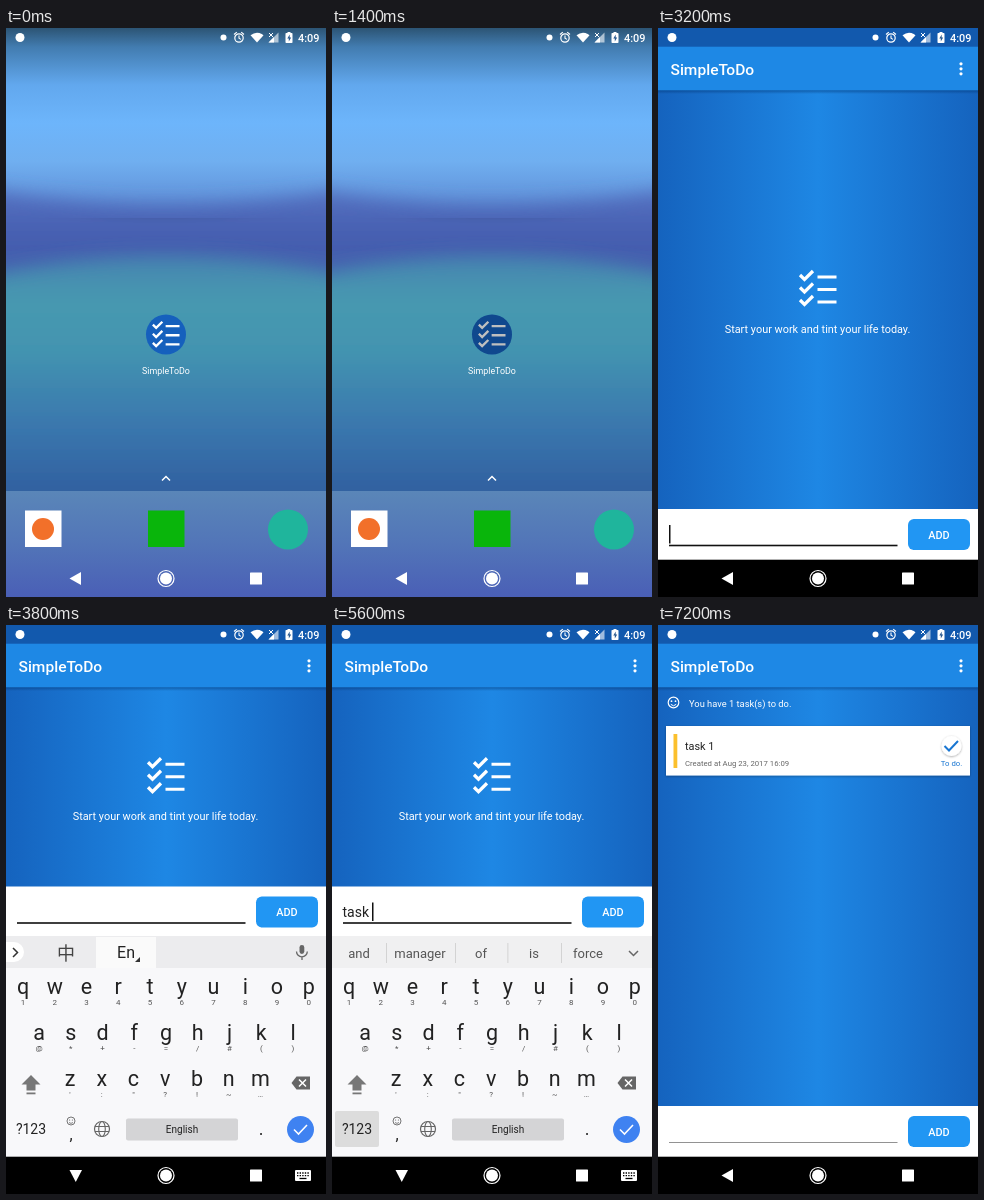
An HTML page for the animation above (8000 ms loop, 320 px wide and 569 px high).

```html
<!DOCTYPE html>
<html lang="en">
<head>
<meta charset="utf-8">
<title>SimpleToDo</title>
<style>
  html, body { margin: 0; width: 100%; height: 100%; overflow: hidden; background: #000; }
  svg { display: block; width: 100vw; height: 100vh; }
  text { font-family: Roboto, "Noto Sans CJK SC", sans-serif; white-space: pre; }
  .mid { text-anchor: middle; }
  .line { fill: none; stroke: #fff; }
</style>
</head>
<body>
<svg id="stage" viewBox="0 0 320 569" preserveAspectRatio="none">
  <defs>
    <linearGradient id="blue">
      <stop offset="0" stop-color="#1563be"/>
      <stop offset=".5" stop-color="#1e87e4"/>
      <stop offset="1" stop-color="#1563be"/>
    </linearGradient>
    <linearGradient id="sky" x2="0" y2="1">
      <stop offset="0" stop-color="#2c5474"/>
      <stop offset=".1" stop-color="#427cb0"/>
      <stop offset=".3" stop-color="#62a8ee"/>
      <stop offset=".5" stop-color="#6db5fb"/>
      <stop offset=".7" stop-color="#70aff0"/>
      <stop offset="1" stop-color="#5a86d0"/>
    </linearGradient>
    <linearGradient id="band" x2="0" y2="1">
      <stop offset="0" stop-color="#5672c2"/>
      <stop offset=".4" stop-color="#445cae"/>
      <stop offset="1" stop-color="#4468b2"/>
    </linearGradient>
    <linearGradient id="sea" gradientUnits="userSpaceOnUse" x1="0" y1="220" x2="0" y2="463">
      <stop offset="0" stop-color="#4580b0"/>
      <stop offset=".22" stop-color="#4699b0"/>
      <stop offset=".42" stop-color="#4394b0"/>
      <stop offset=".72" stop-color="#3a78ae"/>
      <stop offset="1" stop-color="#3160a0"/>
    </linearGradient>
    <linearGradient id="tray" x2="0" y2="1">
      <stop offset="0" stop-color="#5a86b8"/>
      <stop offset=".5" stop-color="#5275b8"/>
      <stop offset="1" stop-color="#4a5fb6"/>
    </linearGradient>
    <linearGradient id="shade" x2="0" y2="1">
      <stop offset="0" stop-color="#00306a" stop-opacity=".5"/>
      <stop offset="1" stop-color="#00306a" stop-opacity="0"/>
    </linearGradient>
    <filter id="soft" x="-20%" y="-30%" width="140%" height="160%"><feGaussianBlur stdDeviation="9"/></filter>
    <filter id="drop" x="-20%" y="-20%" width="140%" height="150%">
      <feDropShadow dx="0" dy=".8" stdDeviation=".8" flood-opacity=".35"/>
    </filter>
    <g id="list" fill="none" stroke="#fff" stroke-width="3.2">
      <path d="M-18-13.500l4.500 4.500 8.500-8.500M-18-1l4.500 4.500 8.500-8.500M-18 11.500l4.500 4.500 8.500-8.500"/>
      <path d="M-.5-11.500h19M-.5 1h19M-.5 13.500h19"/>
    </g>
  </defs>
</svg>
<script>
const stage = document.getElementById('stage');
const STEP = 200, LOOP = 8000;

const rect = (x, y, w, h, fill, more = '') =>
  `<rect x="${x}" y="${y}" width="${w}" height="${h}" fill="${fill}" ${more}/>`;
const disc = (x, y, r, fill, more = '') =>
  `<circle cx="${x}" cy="${y}" r="${r}" fill="${fill}" ${more}/>`;
const line = (d, color, width, more = '') =>
  `<path d="${d}" fill="none" stroke="${color}" stroke-width="${width}" ${more}/>`;
const label = (s, x, y, size, fill = '#fff', more = '') =>
  `<text x="${x}" y="${y}" font-size="${size}" fill="${fill}" ${more}>${s}</text>`;
const mid = (s, x, y, size, fill, more = '') => label(s, x, y, size, fill, 'class="mid" ' + more);
const group = (id, body) => `<g id="${id}">${body}</g>`;
const icon = (x, y, k) => `<use href="#list" transform="translate(${x} ${y}) scale(${k})"/>`;

const wallpaper =
  rect(0, 0, 320, 190, 'url(#sky)') +
  `<path d="M-40 158Q160 196 360 158V300H-40Z" fill="url(#band)" filter="url(#soft)"/>` +
  `<path d="M-40 252Q160 204 360 252V520H-40Z" fill="url(#sea)" filter="url(#soft)"/>`;

const home = wallpaper +
  disc(160, 306.5, 20, '#1560bd') + icon(160, 306.5, .73) +
  disc(160, 306.5, 20, '#000', 'id="press" opacity=".25"') +
  mid('SimpleToDo', 160, 346, 8.9, '#fff') +
  line('M156 452.500l4-4 4 4', '#fff', 1.5);

const tray = rect(0, 463, 320, 106, 'url(#tray)') +
  rect(19, 482.5, 36.5, 36.5, '#fff') + disc(37, 501, 11, '#f2702a') +
  rect(142, 482.5, 36.5, 36.5, '#09b50b') +
  disc(282, 501.5, 20, '#1fb59c');

const empty = icon(160, 260.5, 1) +
  mid('Start your work and tint your life today.', 159.5, 304.5, 10.9, '#fff');

const tasks =
  disc(15.500, 77.500, 5.300, 'none', 'stroke="#fff" stroke-width="1.2"') +
  disc(13.500, 76.200, .9, '#fff') + disc(17.500, 76.200, .9, '#fff') +
  line('M12.800 79.300q2.700 3 5.400 0', '#fff', 1) +
  label('You have 1 task(s) to do.', 31, 81.5, 9.33) +
  rect(8, 101, 304, 49.5, '#fff', 'filter="url(#drop)"') +
  rect(15.500, 109, 3.800, 34, '#fbc02d') +
  label('task 1', 27, 125, 10.9, '#222') +
  label('Created at Aug 23, 2017 16:09', 27, 141, 7.78, '#666') +
  disc(293.500, 121, 10, '#fff', 'filter="url(#drop)"') +
  line('M286.500 121l4.500 4.500 9-9.500', '#1976d2', 2) +
  mid('To do.', 293.500, 141, 7.78, '#1976d2');

const inputBar = rect(0, 481, 320, 51, '#fff') +
  rect(11, 517, 228.5, .8, '#777', 'id="rule"') +
  label('', 10.500, 511.500, 14, '#222', 'id="typed"') +
  rect(11, 497, 1.5, 18.500, '#111', 'id="caret"') +
  rect(250, 491, 62, 31, '#2196f3', 'rx="6" id="add"') +
  mid('ADD', 281, 510.500, 10.9, '#fff', 'font-weight="500"');

const app = rect(0, 0, 320, 532, 'url(#blue)') +
  group('empty', empty) + group('tasks', tasks) +
  rect(0, 62, 320, 4, 'url(#shade)') + rect(0, 18, 320, 44.300, '#1e88e5') +
  label('SimpleToDo', 12.500, 46.500, 15.55, '#fff', 'font-weight="500"') +
  [35.800, 40.800, 45.800].map(y => disc(303, y, 1.600, '#fff')).join('') +
  group('bar', inputBar) +
  rect(0, 0, 320, 18.700, '#1259ad');

/* Keyboard */
const INK = '#222', DIM = '#555';
const spread = (n, x0) => Array.from({ length: n }, (_, i) => x0 + i * 31.75);
const row = (keys, hints, x0, y) => spread(keys.length, x0).map((x, i) =>
  mid(keys[i].replace('&', '&amp;').replace('<', '&lt;'), x, y, 21.5, INK) +
  (hints ? mid(hints[i], x, y + 11, 8, DIM) : '')).join('');

const tools = rect(0, 311, 320, 32, '#ececee') + rect(90, 312, 60, 31, '#fafafa') +
  rect(-10, 317, 28, 20, '#fff', 'rx="10"') + line('M7 323l4.500 4.500-4.500 4.500', '#333', 1.500) +
  mid('中', 60, 334.500, 18, '#444') + mid('En', 120, 333, 16, INK) +
  `<path d="M134 332v5h-5z" fill="#333"/>` +
  rect(293.500, 320, 4.800, 9, '#666', 'rx="2.400"') +
  line('M290.500 326.500a5.400 5.400 0 0 0 10.800 0M296 332v3', '#666', 1.300);

const words = rect(0, 311, 320, 32, '#f0f0f1') +
  [54, 123, 175.500, 229].map(x => rect(x, 318, .8, 20, '#ccc')).join('') +
  [27, 88, 149, 202, 256].map(x => mid('', x, 332.500, 13, DIM, 'data-word')).join('') +
  line('M297 326l4.500 4.500 4.500-4.500', '#666', 1.500);

const letters = row([...'qwertyuiop'], [...'1234567890'], 17, 369) +
  row([...'asdfghjkl'], [...'@*+-=/#()'], 33, 415) +
  row([...'zxcvbnm'], [...'\':"?!~…'], 64, 461) +
  `<path d="M25 450l-9.500 9.500h5v6h9v-6h5z" fill="#777"/>` + rect(20.500, 467.500, 9, 1.800, '#777') +
  mid('?123', 25, 509, 14, INK) +
  disc(65, 496, 4, 'none', 'stroke="#666" stroke-width=".9"') +
  disc(63.600, 495, .6, '#666') + disc(66.400, 495, .6, '#666') + line('M63 497.500q2 1.800 4 0', '#666', .8) +
  mid(',', 65, 515, 16, INK) +
  disc(96, 504, 7.500, 'none', 'stroke="#666" stroke-width="1.200"') +
  `<ellipse cx="96" cy="504" rx="3.300" ry="7.500" fill="none" stroke="#666" stroke-width="1.100"/>` +
  line('M89 501.500h14M89 506.500h14', '#666', 1.100);

const symbols = row([...'1234567890'], null, 17, 373) +
  row([...'@#$%&-+()'], null, 33, 419) + row([...'*"\':;!?'], null, 64, 465) +
  mid('=\\&lt;', 25, 463, 14, INK) + mid('ABC', 25, 509, 13, INK) +
  mid(',', 65, 509, 18, INK) + mid('_', 96, 507, 18, INK);

const board = rect(0, 311, 320, 221, '#f8f8fa') +
  group('tools', tools) + group('words', words) +
  rect(0, 0, 0, 0, '#dcdcdc', 'rx="2" id="hit"') +
  group('letters', letters) + group('symbols', symbols) +
  `<path d="M285.500 458l5-6.500h13.500v13h-13.500z" fill="#666"/>` +
  line('M293 454.500l7 7M300 454.500l-7 7', '#fff', 1.500) +
  rect(120, 493.500, 112, 22, '#d4d4d6', 'rx="2" id="space"') +
  mid('English', 176, 508, 10, INK) + mid('.', 255, 510, 18, INK) +
  disc(294.500, 504.500, 13.500, '#3f82f1') + line('M288 504.500l4.500 4.500 8.500-9', '#fff', 1.600);

const status = disc(14, 9.500, 4.500, '#fff') + disc(217.500, 9.500, 3, '#fff') +
  disc(233, 10, 4.200, 'none', 'stroke="#fff" stroke-width="1.200"') +
  line('M233 7.500v2.700l2 1.200M228 6.500l2.800-2.400M238 6.500l-2.800-2.400', '#fff', 1.100) +
  `<path d="M244.500 7.200q6.500-5 13 0L251 14.500z" fill="#fff"/>` +
  `<path d="M272.500 4.500v10h-10z" fill="#fff" opacity=".6"/><path d="M268 9v5.500h-5.500z" fill="#fff"/>` +
  line('M263 5l4 4M267 5l-4 4', '#fff', 1) +
  rect(279.500, 5, 7, 10, '#fff', 'rx=".8"') + rect(281.500, 4, 3, 2, '#fff') +
  `<path d="M283.700 6.500l-2.400 4h1.500v3l2.400-4h-1.500z" fill="#2a5a90"/>` +
  label('4:09', 292, 13.500, 10.9, '#fff', 'font-weight="500"');

const nav = rect(0, 531.700, 320, 38, '#000', 'id="navBack"') +
  `<path id="back" fill="#fff"/>` +
  disc(160, 550.500, 8, 'none', 'stroke="#fff" stroke-width="1.200"') + disc(160, 550.500, 6, '#fff') +
  rect(244, 544.500, 12, 12, '#fff', 'rx=".6"') +
  group('keys', rect(289, 545, 16, 11, '#fff', 'rx="1"') +
    line('M291 548h12M291 550.700h12', '#000', 1.300, 'stroke-dasharray="1.400 1.200"') +
    line('M293.500 553.500h7', '#000', 1.300));

stage.insertAdjacentHTML('beforeend',
  group('home', home) +
  group('splash', rect(0, 0, 1, 1, 'url(#blue)', 'id="pane"') + group('mark', icon(0, 0, .73))) +
  group('tray', tray) + group('app', app) + group('board', board) + nav + status);

const $ = id => document.getElementById(id);
const show = (id, on) => $(id).setAttribute('display', on ? 'inline' : 'none');
const set = (id, attrs) => { for (const k in attrs) $(id).setAttribute(k, attrs[k]); };
const move = (id, x, y) => set(id, { transform: `translate(${x} ${y})` });

// Splash window: start time, left, top, bottom
const panes = [[1600, 92, 216, 392], [1800, 8, 126, 476], [2000, 0, 0, 532]];
// Typing: start time, text, pressed key box, suggestions, caret shown
const key = (x, y) => [x - 14, y, 28, 40];
const next = 'and manager of is force';
const typing = [
  [3200, '', null, '', 1], [3800, '', null, '', 0],
  [4200, 't', key(144, 347), 'the to that this they', 1],
  [4400, 'ta', key(33, 393), 'take talk table taking tax', 1],
  [4600, 'tas', key(65, 393), 'task taste tasks tasty tass', 1],
  [4800, 'task', key(255, 393), 'task tasks tasked ask tank', 1],
  [5000, 'task', null, 'task tasks tasked ask tank', 1],
  [5200, 'task ', null, next, 1],
  [5600, 'task ', [3, 486, 44, 36], next, 1],
  [5800, 'task ', null, next, 1],
  [6000, 'task 1', key(17, 347), next, 1],
  [6200, 'task 1', null, next, 1],
  [6400, 'task 1', null, next, 0],
  [6800, '', null, next, 0]
];
// Keyboard drop below its resting place
const slide = [[0, 221], [3400, 140], [3600, 0], [7000, 130], [7200, 221]];
const at = (table, t) => table.filter(r => r[0] <= t).pop();

function draw(t) {
  const inApp = t >= 2200, pane = !inApp && at(panes, t);
  show('home', !inApp);
  show('press', t >= 1400 && t < 1600);
  show('splash', pane);
  show('tray', t < 2000);
  show('app', inApp);
  show('navBack', t >= 2000);
  if (pane) {
    const [, x, top, end] = pane;
    set('pane', { x, y: top, width: 320 - 2 * x, height: end - top });
    move('mark', 160, t < 2000 ? 301 : 284.500);
  }

  const drop = at(slide, t)[1], open = drop < 221;
  const raised = t >= 3600 && t < 7000, focus = t >= 3200 && t < 6800, done = t >= 6800;
  show('board', open);
  move('board', 0, drop);
  show('keys', open);
  set('back', { d: open ? 'M63.500 545h12.500l-6.250 12z' : 'M75 544v13l-11.500-6.500z' });
  move('bar', 0, raised ? -219.500 : 0);
  move('empty', 0, raised ? -109.750 : 0);
  show('empty', !done);
  show('tasks', done);
  set('add', { fill: t >= 6800 && t < 7000 ? '#1a7fd4' : '#2196f3' });
  set('rule', focus ? { height: 1.600, y: 516.700, fill: '#111' } : { height: .8, y: 517, fill: '#777' });

  const [, text, hit, hints, caret] = at(typing, t) || [0, '', null, '', 0];
  $('typed').textContent = text;
  const width = text ? $('typed').getComputedTextLength() : 0;
  set('caret', { x: (text ? 10 : 11) + width });
  show('caret', caret && focus);
  show('tools', !hints);
  show('words', hints);
  const list = hints.split(' ');
  document.querySelectorAll('[data-word]').forEach((el, i) => { el.textContent = list[i] || ''; });
  show('hit', hit);
  if (hit) set('hit', { x: hit[0], y: hit[1], width: hit[2], height: hit[3] });
  set('space', { fill: t >= 5200 && t < 5400 ? '#bcbcbe' : '#d4d4d6' });
  const digits = t >= 5800;
  show('letters', !digits);
  show('symbols', digits);
}

const start = performance.now();
let last = -1;
function tick() {
  const t = Math.floor(((performance.now() - start) % LOOP) / STEP) * STEP;
  if (t !== last) draw(last = t);
  requestAnimationFrame(tick);
}
tick();
</script>
</body>
</html>
```
